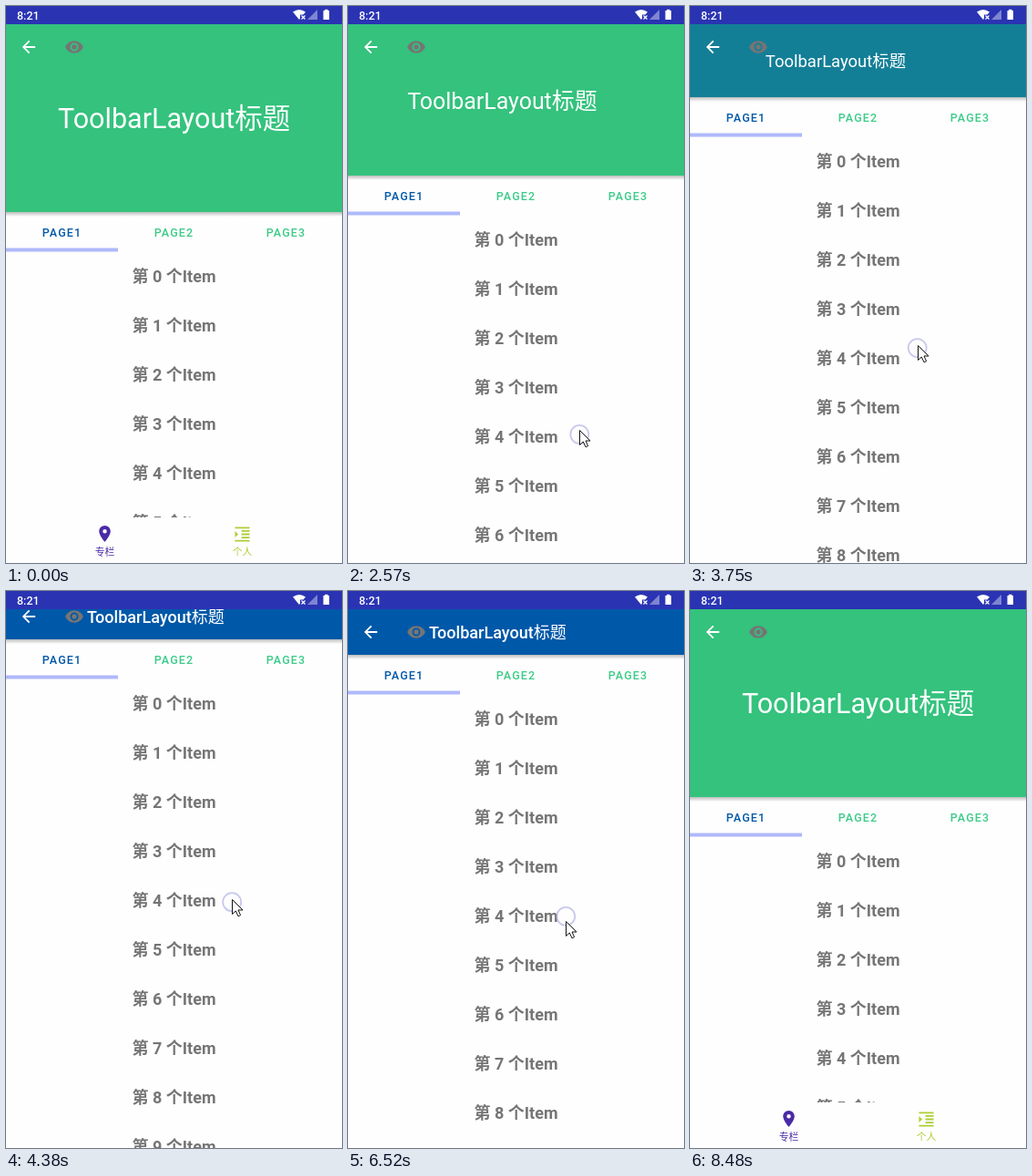
An HTML page with a canvas that plays this animation: 369x611 px, repeating every 8.78 s.

```html
<!DOCTYPE html>
<html lang="zh-CN">
<head>
<meta charset="utf-8">
<style>
  html, body { margin: 0; overflow: hidden; background: #fefefe; }
  canvas { display: block; }
</style>
</head>
<body>
<canvas id="stage" width="369" height="611"></canvas>
<script>
const ctx = document.getElementById('stage').getContext('2d');
const W = 369, H = 611, LOOP = 8780, START = 1120, STEP = 89.76;
const SANS = 'Roboto, "Noto Sans CJK SC", "Noto Sans CJK", sans-serif';
const BAR = 20, TOOLBAR = 70, EXPANDED = 226, NAV = 50;

const icons = {
  back: 'M20 11H7.83l5.59-5.59L12 4l-8 8 8 8 1.41-1.41L7.83 13H20z',
  eye: 'M12 4.5C7 4.5 2.73 7.61 1 12c1.73 4.39 6 7.5 11 7.5s9.27-3.11 11-7.5c-1.73-4.39-6-7.5-11-7.5z' +
    'M12 17a5 5 0 1 1 0-10 5 5 0 0 1 0 10zM12 9a3 3 0 1 0 0 6 3 3 0 0 0 0-6z',
  pin: 'M12 2C8.13 2 5 5.13 5 9c0 5.25 7 13 7 13s7-7.75 7-13c0-3.87-3.13-7-7-7zM12 11.5a2.5 2.5 0 1 1 0-5 2.5 2.5 0 0 1 0 5z',
  indent: 'M3 21h18v-2H3zM3 8v8l4-4zM11 17h10v-2H11zM3 3v2h18V3zM11 9h10V7H11zM11 13h10v-2H11z'
};
for (const name in icons) icons[name] = new Path2D(icons[name]);
const arrow = new Path2D('M.5 .5V16.5L4.3 13 7 18.8 9.6 17.6 7 12H12z');
const wifi = new Path2D('M315 6.5Q322 1.5 329 6.5L326.5 9.5H323V13.5L322 15z');
const wifiCross = new Path2D('M324.5 10.5l4 4m0-4l-4 4');

const clamp = v => Math.min(1, Math.max(0, v));
const lerp = (a, b, p) => a + (b - a) * p;

// Monotone cubic through points [step, ...values]
function curve(points, col) {
  const rate = i => points[i + 1] && i >= 0
    ? (points[i + 1][col] - points[i][col]) / (points[i + 1][0] - points[i][0]) : 0;
  const slope = i => {
    const a = rate(i - 1), b = rate(i);
    return a * b > 0 ? 2 * a * b / (a + b) : 0;
  };
  const last = points.length - 1;
  return k => {
    if (k <= points[0][0]) return points[0][col];
    if (k >= points[last][0]) return points[last][col];
    const i = points.findIndex(p => p[0] > k) - 1;
    const span = points[i + 1][0] - points[i][0], u = (k - points[i][0]) / span;
    const ease = u * u * (3 - 2 * u);
    return lerp(points[i][col], points[i + 1][col], ease) +
      span * u * (1 - u) * (slope(i) * (1 - u) - slope(i + 1) * u);
  };
}

const scrollAt = curve([[10, 0], [16, 40], [23, 91], [30, 132], [36, 173], [47, 240], [48, 240],
  [51, 222], [58, 170], [65, 118], [68, 60], [71, 0]], 1);
const pointer = [[0, 341, 453], [6, 260, 517], [9, 260, 517], [10, 258, 512], [16, 254, 465],
  [23, 251, 405], [36, 248, 338], [47, 244, 276], [48, 244, 276], [51, 242, 297], [58, 240, 346],
  [65, 234, 410], [68, 230, 473], [71, 225, 530], [76, 225, 530], [81, 288, 582]];
const pointerX = curve(pointer, 1), pointerY = curve(pointer, 2);

function rect(color, x, y, w, h) {
  ctx.fillStyle = color;
  ctx.fillRect(x, y, w, h);
}

function text(str, x, y, size, color, weight = 400, align = 'center', spacing = 0) {
  ctx.font = `${weight} ${size}px ${SANS}`;
  ctx.letterSpacing = spacing + 'px';
  ctx.textAlign = align;
  ctx.fillStyle = color;
  ctx.fillText(str, x, y);
}

function icon(name, cx, cy, color, size = 21.5) {
  ctx.save();
  ctx.translate(cx - size / 2, cy - size / 2);
  ctx.scale(size / 24, size / 24);
  ctx.fillStyle = color;
  ctx.fill(icons[name], 'evenodd');
  ctx.restore();
}

function clipped(y, bottom, draw) {
  ctx.save();
  ctx.beginPath();
  ctx.rect(0, y, W, bottom - y);
  ctx.clip();
  draw();
  ctx.restore();
}

function drawList(scroll, top) {
  clipped(top, H, () => {
    for (let i = 0; i < 12; i++) {
      text(`第 ${i} 个Item`, 184.5, 303 - scroll + i * 54, 18, '#757575', 700);
    }
  });
}

function drawTabs(y) {
  for (let i = 0; i < 3; i++) {
    text('PAGE' + (i + 1), 61.5 + i * 123, y + 26.5, 12.5, i ? '#3ccb88' : '#0058a8', 500, 'center', 1.12);
  }
  rect('#afb9fb', 0, y + 39.5, 123, 4);
  const shadow = ctx.createLinearGradient(0, y, 0, y + 5);
  shadow.addColorStop(0, 'rgba(0,0,0,.26)');
  shadow.addColorStop(1, 'rgba(0,0,0,0)');
  rect(shadow, 0, y, W, 5);
}

function drawHeader(scroll, bottom, scrim) {
  clipped(BAR, bottom, () => {
    rect('#34c27d', 0, BAR, W, bottom - BAR);
    rect(`rgba(0,88,168,${scrim})`, 0, BAR, W, bottom - BAR);
    const shift = Math.min(0, bottom - TOOLBAR);
    const f = clamp(scroll / (EXPANDED - TOOLBAR));
    icon('back', 25, 45 + shift, '#fff');
    icon('eye', 75, 45 + shift, '#757575');
    text('ToolbarLayout标题', lerp(57, 89, f), lerp(134, 51.5, f) + shift,
      lerp(18, 30.5, (1 - f) ** 2), '#fff', f === 1 ? 500 : 400, 'left');
  });
}

function drawStatusBar() {
  rect('#2a34b3', 0, 0, W, BAR);
  text('8:21', 12, 14.5, 12.5, '#fff', 500, 'left');
  ctx.fill(wifi);
  ctx.strokeStyle = '#fff';
  ctx.lineWidth = 1.2;
  ctx.stroke(wifiCross);
  ctx.fillStyle = 'rgba(255,255,255,.4)';
  ctx.fill(new Path2D('M342 4V15H331z'));
  rect('#fff', 348.5, 5, 6.5, 10);
  rect('#fff', 350, 3.8, 3.5, 1.2);
}

function drawNav(hidden) {
  const y = H - NAV + hidden * NAV;
  rect('#fefefe', 0, y, W, NAV);
  icon('pin', 108.5, y + 18, '#4a2aa5');
  text('专栏', 108.5, y + 41.5, 10.8, '#4a2aa5');
  icon('indent', 259.5, y + 18.5, '#afcd36');
  text('个人', 259.5, y + 41.5, 10.8, '#afcd36');
}

function drawPointer(k) {
  if (k < 0 || k > 81) return;
  if (k >= 10 && k <= 76) {
    ctx.beginPath();
    ctx.arc(pointerX(k - .6), pointerY(k - .6), 10, 0, 7);
    ctx.fillStyle = 'rgba(255,255,255,.35)';
    ctx.fill();
    ctx.strokeStyle = 'rgba(165,165,225,.6)';
    ctx.lineWidth = 1.8;
    ctx.stroke();
  }
  ctx.save();
  ctx.translate(Math.round(pointerX(k)), Math.round(pointerY(k)));
  ctx.fillStyle = '#fff';
  ctx.fill(arrow);
  ctx.strokeStyle = '#111';
  ctx.lineWidth = 1;
  ctx.stroke(arrow);
  ctx.restore();
}

function draw(now) {
  // The screen refreshes in discrete steps
  const k = Math.floor((now % LOOP - START) / STEP);
  const scroll = Math.round(scrollAt(k));
  const bottom = Math.max(BAR, EXPANDED - scroll);
  const scrim = k < 60 ? clamp((k - 24) / 6.7) ** 1.6 : (1 - clamp((k - 67.6) / 6.7)) ** 2;
  const hidden = k < 60 ? clamp((k - 11) / 2) ** 2 : (1 - clamp((k - 68) / 2.5)) ** 2;

  rect('#fefefe', 0, 0, W, H);
  drawList(scroll, bottom + 43);
  drawTabs(bottom);
  drawHeader(scroll, bottom, scrim);
  drawStatusBar();
  drawNav(hidden);
  drawPointer(k);
  requestAnimationFrame(draw);
}
requestAnimationFrame(draw);
</script>
</body>
</html>
```
